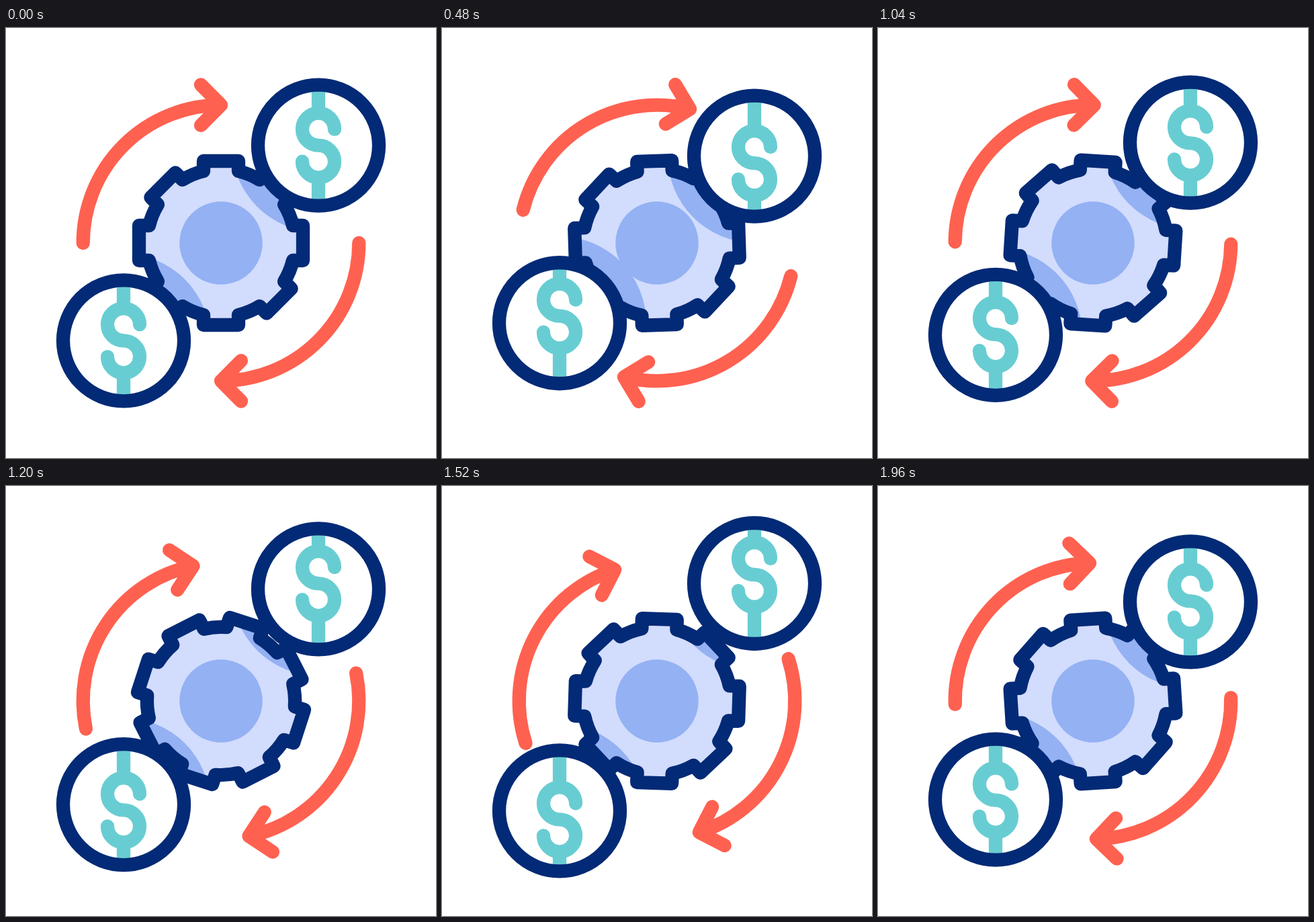
Recreate the animation shown at these times as an HTML page with a canvas. Size 640 by 640 pixels, loop 2000 ms.

```html
<!DOCTYPE html>
<html lang="en">
<head>
<meta charset="utf-8">
<title>Money cycle</title>
<style>
  html, body { margin: 0; width: 100%; height: 100%; overflow: hidden; background: #fff; }
  canvas { display: block; width: 100vmin; height: 100vmin; }
</style>
</head>
<body>
<canvas id="stage" width="640" height="640"></canvas>
<script>
const ctx = document.getElementById('stage').getContext('2d');
const NAVY = '#032a76', RED = '#ff6150', TEAL = '#68cdd2', LIGHT = '#d2dcfd', BLUE = '#94b1f3';
const LOOP = 2000, STEP = 40, HIGH = 720, LOW = 1400;
const TAU = Math.PI * 2, RAD = Math.PI / 180;

const circle = r => {
  const p = new Path2D();
  p.arc(0, 0, r, 0, TAU);
  return p;
};

function makeGear() {
  const p = new Path2D();
  const half = 26, top = -122, foot = -107;
  for (let i = 0; i < 8; i++) {
    const a = i * TAU / 8, c = Math.cos(a), s = Math.sin(a);
    const to = (x, y) => p.lineTo(x * c - y * s, x * s + y * c);
    to(-half, foot);
    to(-half, top);
    to(half, top);
    to(half, foot);
    const spread = Math.atan2(half, -foot);
    p.arc(0, 0, Math.hypot(half, foot), a + spread - TAU / 4, a + TAU / 8 - spread - TAU / 4);
  }
  p.closePath();
  return p;
}

function makeDollar() {
  const p = new Path2D();
  p.arc(0, -24, 24, 0, TAU / 4, true);
  p.arc(0, 24, 24, -TAU / 4, TAU / 2);
  p.moveTo(0, -48);
  p.lineTo(0, -130);
  p.moveTo(0, 48);
  p.lineTo(0, 130);
  return p;
}

const gear = makeGear(), dollar = makeDollar();
const rim = circle(90), hub = circle(61.7), shade = circle(129);
const arrow = new Path2D();
arrow.arc(0, 0, 205.3, TAU / 2, TAU * 3 / 4);
arrow.moveTo(-30, -235.5);
arrow.lineTo(0, -205.3);
arrow.lineTo(-30, -175.1);

// Swing from rest to high, over to low, and back to rest
const easeIn = u => u * u * (2 - u);
const smooth = u => u * u * (3 - 2 * u);
function swing(t, high, low) {
  if (t < HIGH) return high * (1 - easeIn(1 - t / HIGH));
  if (t < LOW) return high + (low - high) * smooth((t - HIGH) / (LOW - HIGH));
  return low * (1 - easeIn((t - LOW) / (LOOP - LOW)));
}

function at(x, y, turn, draw) {
  ctx.save();
  ctx.translate(x, y);
  ctx.rotate(turn * RAD);
  draw();
  ctx.restore();
}

function fill(path, color) {
  ctx.fillStyle = color;
  ctx.fill(path);
}

function stroke(path, color) {
  ctx.strokeStyle = color;
  ctx.stroke(path);
}

function drawGear(turn, coins) {
  at(0, 0, turn, () => {
    fill(gear, LIGHT);
    ctx.clip(gear);
    ctx.rotate(-turn * RAD);
    for (const c of coins) at(c.x, c.y, 0, () => fill(shade, BLUE));
  });
  fill(hub, BLUE);
  at(0, 0, turn, () => stroke(gear, NAVY));
}

function drawCoin({ x, y, slide }) {
  at(x, y, 0, () => {
    fill(rim, '#fff');
    ctx.save();
    ctx.clip(rim);
    ctx.translate(0, slide);
    stroke(dollar, TEAL);
    ctx.restore();
    stroke(rim, NAVY);
  });
}

function frame() {
  const t = Math.floor((performance.now() % LOOP) / STEP + 0.001) * STEP;
  const slide = swing(t, 13, -14);
  const coins = [
    { x: 145, y: -145.3 + swing(t, 19.5, -32), slide },
    { x: -145, y: 145.3 + swing(t, -32, 19.5), slide: -slide }
  ];
  const tilt = swing(t, 17, -19.2);

  ctx.fillStyle = '#fff';
  ctx.fillRect(0, 0, 640, 640);
  ctx.lineWidth = 20.3;
  ctx.lineCap = ctx.lineJoin = 'round';
  at(320, 320, 0, () => {
    for (const turn of [0, 180]) at(0, 0, tilt + turn, () => stroke(arrow, RED));
    drawGear(t / LOOP * 180, coins);
    coins.forEach(drawCoin);
  });
  requestAnimationFrame(frame);
}
frame();
</script>
</body>
</html>
```
